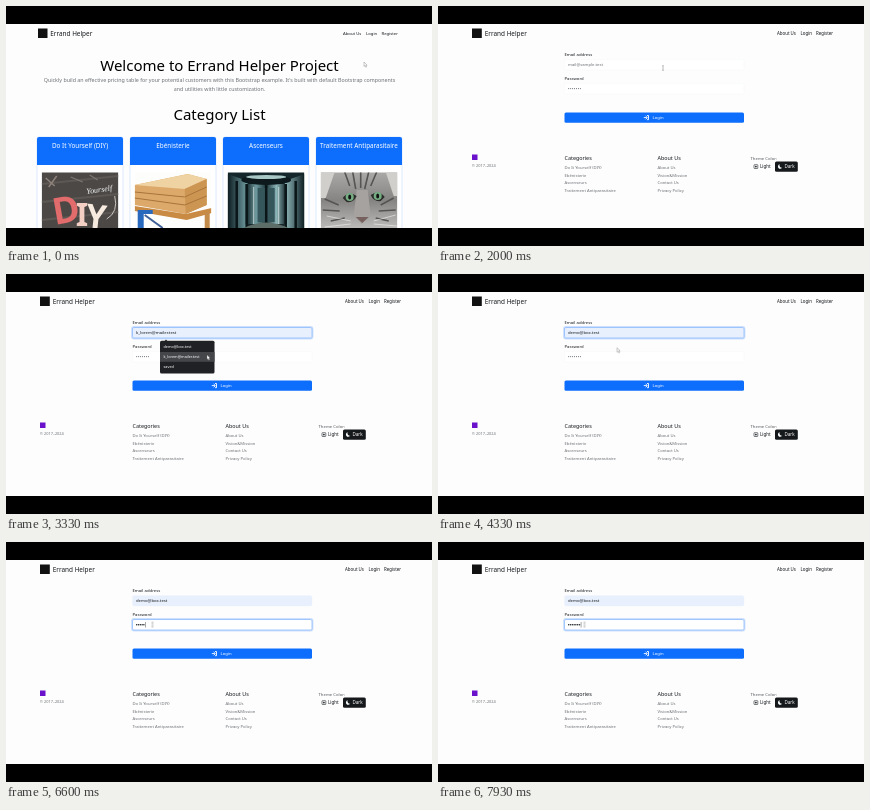
Animation, 426 px wide and 240 px high, one loop 8000 ms. Source, as an HTML page:

```html
<!DOCTYPE html>
<html lang="en">
<head>
<meta charset="utf-8">
<title>Errand Helper</title>
<style>
  html, body { margin: 0; width: 100%; height: 100%; overflow: hidden; background: #000; }
  svg { display: block; width: 100vw; height: 100vh; }
  text { font-family: "Noto Sans", "Open Sans", sans-serif; font-size: 4.25px; fill: #16191c; }
  .mid { text-anchor: middle; }
  .h1 { font-size: 15px; fill: #000; }
  .lead { font-size: 5.32px; fill: #6c7075; }
  .brand { font-size: 6.4px; }
  .card { font-size: 6.35px; fill: #fff; }
  .h5 { font-size: 5.4px; font-weight: 500; }
  .soft text, .soft { font-size: 4.2px; fill: #6c7075; }
  .white { fill: #fff; }
  .menu text { fill: #fff; font-size: 3.8px; }
  .field { fill: #fff; stroke: #f3f4f6; stroke-width: .4; }
  .focus { fill: none; stroke: #86b7fe; stroke-width: .7; }
  .glow { fill: none; stroke: #0d6efd; stroke-opacity: .2; stroke-width: 1.4; }

  .timed { animation: 8s step-end infinite; opacity: 0; }
  .home { animation-name: home; }
  .login { animation-name: login; }
  .status { animation-name: status; }
  .mailFocus { animation-name: mailFocus; }
  .hint { animation-name: hint; }
  .filled { animation-name: filled; }
  .menu { animation-name: menu; }
  .row1 { animation-name: row1; }
  .row2 { animation-name: row2; }
  .first { animation-name: first; }
  .passFocus { animation-name: passFocus; }
  .stars { animation-name: stars; }
  .dot { animation-name: dot; animation-delay: calc(var(--i) * 150ms); }
  .caret { animation: caretShow 8s step-end infinite, caretMove 8s infinite; }
  .arrow { animation-name: arrow; }
  .hand { animation-name: hand; }
  .beam { animation-name: beam; }
  .pointer { animation: travel 8s ease-in-out infinite; }

  @keyframes home { 0% { opacity: 1 } 20% { opacity: 0 } }
  @keyframes login { 0% { opacity: 0 } 20% { opacity: 1 } }
  @keyframes status { 0% { opacity: 0 } 11.6% { opacity: .85 } 12.4% { opacity: 1 } 23.4% { opacity: 0 } }
  @keyframes mailFocus { 0% { opacity: 0 } 30% { opacity: 1 } 59.5% { opacity: 0 } }
  @keyframes hint { 0% { opacity: 1 } 37% { opacity: 0 } }
  @keyframes filled { 0% { opacity: 0 } 37% { opacity: 1 } }
  @keyframes menu { 0% { opacity: 0 } 31.6% { opacity: 1 } 52% { opacity: 0 } }
  @keyframes row2 { 0% { opacity: 0 } 37% { opacity: 1 } 47% { opacity: 0 } }
  @keyframes row1 { 0% { opacity: 0 } 47% { opacity: 1 } 52% { opacity: 0 } }
  @keyframes first { 0% { opacity: 0 } 47% { opacity: 1 } }
  @keyframes passFocus { 0% { opacity: 0 } 59.5% { opacity: 1 } }
  @keyframes stars { 0% { opacity: 1 } 74% { opacity: 0 } }
  @keyframes dot { 0% { opacity: 0 } 74% { opacity: 1 } }
  @keyframes caretShow { 0% { opacity: 0 } 74% { opacity: 1 } }
  @keyframes caretMove {
    0% { transform: translateX(1.8px); animation-timing-function: step-end }
    74% { transform: translateX(1.8px); animation-timing-function: steps(6) }
    85.25%, 100% { transform: translateX(12.6px) }
  }
  @keyframes arrow { 0% { opacity: 1 } 11% { opacity: 0 } 18.5% { opacity: 1 } 23.5% { opacity: 0 } 34% { opacity: 1 } 55% { opacity: 0 } }
  @keyframes hand { 0% { opacity: 0 } 11% { opacity: 1 } 18.5% { opacity: 0 } }
  @keyframes beam { 0% { opacity: 0 } 23.5% { opacity: 1 } 34% { opacity: 0 } 55% { opacity: 1 } }
  @keyframes travel {
    0%, 2% { transform: translate(358px, 56px) }
    11%, 17.5% { transform: translate(369.5px, 28px) }
    24.5%, 33% { transform: translate(225px, 62px) }
    39%, 44% { transform: translate(201px, 81px) }
    48%, 52.5% { transform: translate(185px, 72px) }
    58.5%, 100% { transform: translate(146.5px, 82.6px) }
  }
</style>
</head>
<body>
<svg viewBox="0 0 426 240">
  <defs>
    <clipPath id="page"><rect y="18" width="426" height="204"/></clipPath>
    <clipPath id="photo"><rect y="166.500" width="76.500" height="56"/></clipPath>
    <linearGradient id="glass">
      <stop stop-color="#0c1c20"/><stop offset=".25" stop-color="#6f9ba0"/>
      <stop offset=".5" stop-color="#1b343a"/><stop offset=".75" stop-color="#8db5b8"/>
      <stop offset="1" stop-color="#0c1c20"/>
    </linearGradient>
    <linearGradient id="fur" x2="0" y2="1">
      <stop stop-color="#aaa9a7"/><stop offset=".5" stop-color="#858482"/><stop offset="1" stop-color="#bdbcba"/>
    </linearGradient>
    <g id="eye">
      <path d="M-7 1Q-1-7 7-1Q4 6-3 5Z" fill="#2c2e2b"/>
      <circle r="4" fill="#77ad82"/><ellipse rx="1.500" ry="2.500" fill="#111"/>
    </g>
  </defs>

  <g clip-path="url(#page)">
    <rect y="18" width="426" height="204" fill="#fdfdfd"/>

    <g class="timed home">
      <rect x="32" y="22.500" width="9.500" height="9.500" fill="#111"/>
      <text class="brand" x="44.300" y="29.900">Errand Helper</text>
      <text x="337" y="29.100">About Us</text>
      <text x="360" y="29.100">Login</text>
      <text x="375.500" y="29.100">Register</text>
      <text class="h1 mid" x="213.500" y="65">Welcome to Errand Helper Project</text>
      <text class="lead mid" x="213.500" y="76.300">Quickly build an effective pricing table for your potential customers with this Bootstrap example. It's built with default Bootstrap components</text>
      <text class="lead mid" x="213.500" y="85.100">and utilities with little customization.</text>
      <text class="h1 mid" x="213.500" y="114">Category List</text>

      <g id="cards"></g>

      <g transform="translate(35.700)" clip-path="url(#photo)">
        <rect y="166" width="77" height="57" fill="#4b4846"/>
        <path d="M0 178L77 170M0 196L77 188M0 214L77 206" stroke="#5d5854" stroke-width="2"/>
        <path d="M4 172l9 8M15 170l-8 11" stroke="#8e827a" stroke-width="1.500"/>
        <path d="M29 171l12 5M48 169l8 5" stroke="#7d7671" stroke-width="1.200"/>
        <text x="45" y="188" transform="rotate(-8 45 188)" style="font:italic 8px 'Liberation Serif',serif;fill:#fff">Yourself</text>
        <path d="M73 190q4 16-8 23" fill="none" stroke="#e8e4df" stroke-width=".8"/>
        <g style="font-weight:800">
          <text x="13" y="219" transform="rotate(-10 13 219)" style="font-size:37px;font-weight:800;fill:#e26b6c">D</text>
          <text x="34" y="220" style="font-size:32px;font-weight:800;fill:#f3cfc4">I</text>
          <text x="43" y="221" transform="rotate(6 43 221)" style="font-size:33px;font-weight:800;fill:#f7ebdf">Y</text>
        </g>
      </g>

      <g transform="translate(128.700)" clip-path="url(#photo)">
        <rect y="166" width="77" height="57" fill="#fdfdfc"/>
        <path d="M0 179L53 168L72 173V199L51 208L0 199Z" fill="#dca96a"/>
        <path d="M0 179L53 168L72 173L50 183Z" fill="#f0d3a2"/>
        <path d="M50 183L72 173V199L51 208Z" fill="#cd9552"/>
        <path d="M0 186L50 191L72 181M0 192L50 199L72 190" fill="none" stroke="#a8743b" stroke-width="1"/>
        <path d="M0 200L51 208L77 202V207L52 214L0 205Z" fill="#c98a43"/>
        <path d="M3 204h15v4H9v15H3Z" fill="#2868bd"/>
        <path d="M10 209l18 13" stroke="#3d5f95" stroke-width="2"/>
        <path d="M70 206h5v17h-5z" fill="#c48c4a"/>
      </g>

      <g transform="translate(221.700)" clip-path="url(#photo)">
        <rect y="166" width="77" height="57" fill="#14262a"/>
        <path d="M0 168L20 175V223H0ZM77 168L57 175V223H77Z" fill="url(#glass)"/>
        <path d="M18 178h41v40H18z" fill="url(#glass)"/>
        <path d="M30 182h17v34H30z" fill="#35565b"/>
        <ellipse cx="38.500" cy="174" rx="25" ry="5" fill="#0d191c"/>
        <ellipse cx="38.500" cy="171" rx="20" ry="2" fill="#a9c7c5"/>
        <path d="M9 175v48M19 178v45M38.500 179v44M58 178v45M68 175v48" stroke="#0a1517" stroke-width="2.500"/>
        <path d="M26 181v37M51 181v37" stroke="#d4e3df" stroke-width=".8"/>
        <path d="M14 223Q38 210 63 223" fill="#5d6e69"/>
      </g>

      <g transform="translate(314.700)" clip-path="url(#photo)">
        <rect y="166" width="77" height="57" fill="url(#fur)"/>
        <path d="M0 166H14L5 192H0ZM77 166H65L73 190H77Z" fill="#d0cfcc"/>
        <path d="M24 166l5 14M32 166l3 17M40 166v16M48 166l-4 17M56 166l-6 14M4 193l14 6M2 204l17 1M10 215l14-3M73 192l-13 7M75 204l-17 1M68 215l-13-3" stroke="#555452" stroke-width="1.600"/>
        <path d="M36 184L33 210L41 218L50 210L47 184Z" fill="#a5a29f"/>
        <use href="#eye" x="29" y="191"/>
        <use href="#eye" transform="translate(57 190) scale(-1 1)"/>
        <path d="M35 211h13l-6.500 6Z" fill="#77615e"/>
        <path d="M30 215L6 210M30 218L4 221M53 215L75 209M53 218L76 220" stroke="#f3f3f2" stroke-width=".6"/>
      </g>
    </g>

    <g class="timed login">
      <rect x="34" y="22.500" width="9.800" height="9.500" fill="#111"/>
      <text class="brand" x="46.800" y="29.900">Errand Helper</text>
      <text x="339" y="29.100" style="font-size:4.400px">About Us</text>
      <text x="362.500" y="29.100" style="font-size:4.400px">Login</text>
      <text x="378" y="29.100" style="font-size:4.400px">Register</text>

      <text x="126.500" y="49.500">Email address</text>
      <rect class="field" x="126.500" y="53.500" width="179.500" height="10.500" rx="1.500"/>
      <text class="timed hint soft" x="130" y="60.400">mail@sample.test</text>
      <g class="timed filled">
        <rect x="126.500" y="53.500" width="179.500" height="10.500" rx="1.500" fill="#e8f0fe"/>
        <text class="timed row2" x="130" y="60.400">k_lorem@mailer.test</text>
        <text class="timed first" x="130" y="60.400">demo@box.test</text>
      </g>
      <g class="timed mailFocus">
        <rect class="glow" x="125.800" y="52.800" width="180.900" height="11.900" rx="2"/>
        <rect class="focus" x="126.500" y="53.500" width="179.500" height="10.500" rx="1.500"/>
      </g>

      <text x="126.500" y="73.500">Password</text>
      <rect class="field" x="126.500" y="77.500" width="179.500" height="10.500" rx="1.500"/>
      <g class="timed passFocus">
        <rect class="glow" x="125.800" y="76.800" width="180.900" height="11.900" rx="2"/>
        <rect class="focus" x="126.500" y="77.500" width="179.500" height="10.500" rx="1.500"/>
        <g id="dots"></g>
        <path class="caret" d="M130.300 80v5.500" stroke="#212529" stroke-width=".5"/>
      </g>
      <path class="timed stars" d="M130.700 82.600h13" stroke="#6c7075" stroke-width="1.100" stroke-linecap="round" stroke-dasharray="0 1.950"/>

      <rect x="126.500" y="106.500" width="179.500" height="10.300" rx="1.500" fill="#0d6efd"/>
      <path d="M205.800 111.600h3M207.700 110l1.700 1.600l-1.700 1.600M209 109.500h1.500v4.200H209" fill="none" stroke="#fff" stroke-width=".9"/>
      <text class="white" x="214.500" y="113.300">Login</text>

      <rect x="34" y="148.500" width="5.500" height="5.500" fill="#6a11cb"/>
      <text class="soft" x="33.800" y="161" style="font-size:3.900px">© 2017–2024</text>
      <text class="h5" x="126.500" y="154">Categories</text>
      <g class="soft">
        <text x="126.500" y="162.500">Do It Yourself (DIY)</text>
        <text x="126.500" y="170.500">Ebénisterie</text>
        <text x="126.500" y="178.300">Ascenseurs</text>
        <text x="126.500" y="186.200">Traitement Antiparasitaire</text>
      </g>
      <text class="h5" x="219.500" y="154">About Us</text>
      <g class="soft">
        <text x="219.500" y="162.500">About Us</text>
        <text x="219.500" y="170.500">Vision&amp;Mission</text>
        <text x="219.500" y="178.300">Contact Us</text>
        <text x="219.500" y="186.200">Privacy Policy</text>
      </g>
      <text x="312.500" y="153.700" style="fill:#555a5f">Theme Color:</text>
      <rect x="316" y="158.700" width="3.800" height="3.800" rx=".5" fill="none" stroke="#212529" stroke-width=".6"/>
      <circle cx="317.900" cy="160.600" r=".9" fill="#212529"/>
      <text x="322" y="162.200" style="font-size:4.500px">Light</text>
      <rect x="337" y="155.500" width="22.800" height="10.300" rx="1.500" fill="#16191c"/>
      <path d="M341.700 158.300a2.300 2.300 0 1 0 2.600 3.300a2.300 2.300 0 0 1-2.600-3.300z" fill="#fff"/>
      <text class="white" x="346.500" y="162.200" style="font-size:4.500px">Dark</text>

      <g class="timed menu">
        <path d="M157 69l3-3.500l3 3.500z" fill="#202124"/>
        <rect x="154" y="66.700" width="54.500" height="32.800" rx="1.500" fill="#202124"/>
        <rect class="timed row1" x="154" y="68" width="54.500" height="9.800" fill="#44464a"/>
        <rect class="timed row2" x="154" y="78" width="54.500" height="9.800" fill="#44464a"/>
        <text x="157.500" y="74.200">demo@box.test</text>
        <text x="157.500" y="84.300">k_lorem@mailer.test</text>
        <text x="157.500" y="94.400">saved</text>
        <path class="timed row2" d="M201.700 82l1.800 1.800m0-1.800l-1.800 1.800" stroke="#bbb" stroke-width=".4"/>
      </g>
    </g>

    <g class="timed status">
      <rect y="218" width="42" height="4" fill="#d0d1d3"/>
      <text x="1" y="221" style="font-size:2.800px;fill:#777">127.0.0.1:8000/login</text>
    </g>

    <g class="pointer">
      <path class="timed arrow" d="M0 0v4.400l1-.9l.8 1.700l.8-.4l-.8-1.600h1.300z" fill="#fff" stroke="#666" stroke-width=".35"/>
      <path class="timed hand" d="M.2 .5q.7-.7 1 .1v2l1.500 .5q.6.300.5 1l-.5 1.500H.8L-.7 3.500q.3-.6.900 0z" fill="#fff" stroke="#444" stroke-width=".4"/>
      <path class="timed beam" d="M-.7-2.300h1.400M0-2.300v4.600M-.7 2.300h1.400" fill="none" stroke="#555" stroke-width=".4"/>
    </g>
  </g>
</svg>
<script>
  const fill = (id, items, draw) =>
    document.getElementById(id).innerHTML = items.map(draw).join("");

  fill("cards", ["Do It Yourself (DIY)", "Ebénisterie", "Ascenseurs", "Traitement Antiparasitaire"], (title, i) => {
    const x = 31 + i * 93;
    return `<rect x="${x}" y="131" width="86" height="100" rx="2" fill="#fff" stroke="#a9c9fb" stroke-width=".4"/>
      <path d="M${x} 159v-26q0-2 2-2h82q2 0 2 2v26z" fill="#0d6efd"/>
      <text class="card mid" x="${x + 43}" y="142.200">${title}</text>`;
  });

  fill("dots", [...Array(7).keys()], i =>
    `<circle class="timed dot" style="--i:${i}" cx="${130.7 + i * 1.8}" cy="82.700" r=".75" fill="#212529"/>`);
</script>
</body>
</html>
```
